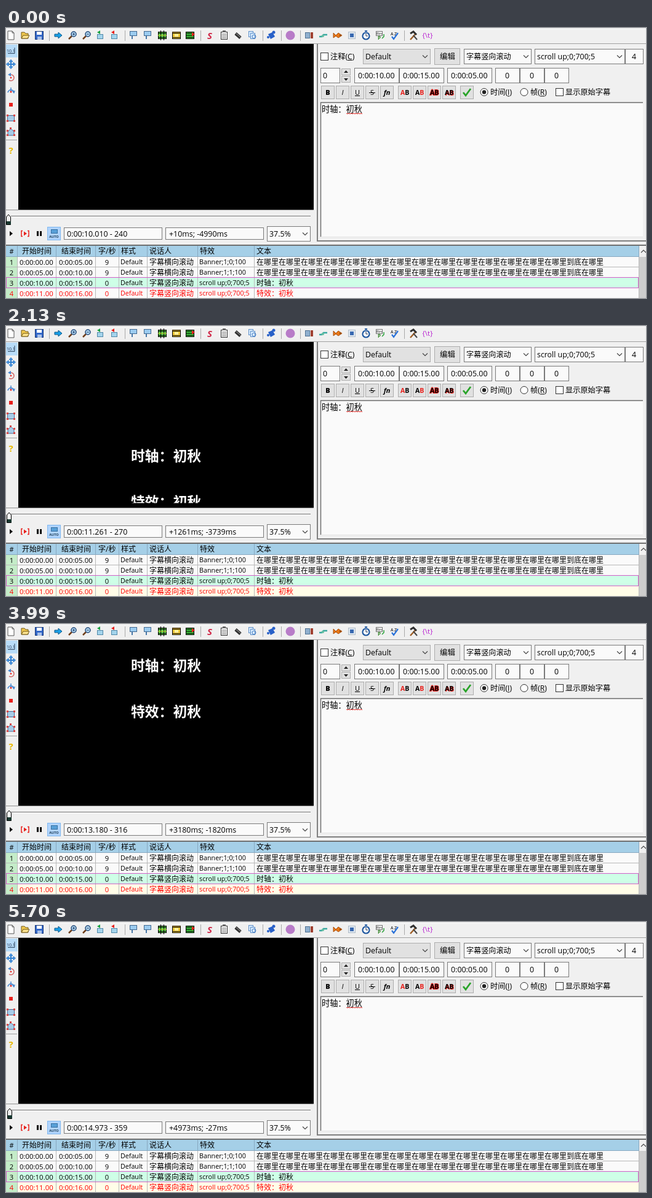
These frames come from a looping animation (1040x440 px, 6.45 s). An HTML page with a canvas:

```html
<!DOCTYPE html>
<html lang="zh-CN">
<head>
<meta charset="utf-8">
<title>字幕竖向滚动</title>
<style>
html, body { margin: 0; height: 100%; overflow: hidden; background: #f0f0f0; }
canvas { display: block; }
</style>
</head>
<body>
<canvas id="stage" width="1040" height="440"></canvas>
<script>
const FONT = '"Open Sans", "Noto Sans CJK SC", "Noto Sans CJK", sans-serif';
const LOOP = 6450;
const FACE = '#f0f0f0', PAPER = '#fafafa', EDGE = '#7a7a7a', BLUE = '#2f7fd0', RED = '#e8201c';
const TIMING = '时轴：初秋', EFFECT = '特效：初秋';
const canvas = document.getElementById('stage');
let g = canvas.getContext('2d', { alpha: false });

function rect(x, y, w, h, fill, edge) {
  if (fill) { g.fillStyle = fill; g.fillRect(x, y, w, h); }
  if (edge) { g.strokeStyle = edge; g.lineWidth = 1; g.strokeRect(x + .5, y + .5, w - 1, h - 1); }
}
function path(points, color, width = 1.5) {
  g.beginPath();
  for (let i = 0; i < points.length; i += 2) g.lineTo(points[i], points[i + 1]);
  g.strokeStyle = color; g.lineWidth = width; g.stroke();
}
function poly(points, fill, edge) {
  g.beginPath();
  for (let i = 0; i < points.length; i += 2) g.lineTo(points[i], points[i + 1]);
  g.closePath();
  g.fillStyle = fill; g.fill();
  if (edge) { g.strokeStyle = edge; g.lineWidth = 1; g.stroke(); }
}
function arc(x, y, r, fill, edge, width = 1.5, from = 0, to = 7) {
  g.beginPath(); g.arc(x, y, r, from, to);
  if (fill) { g.fillStyle = fill; g.fill(); }
  if (edge) { g.strokeStyle = edge; g.lineWidth = width; g.stroke(); }
}
// Text placed by its left edge (or centre) and vertical middle
function text(s, x, mid, size = 12.4, color = '#000', style = '', align = 'left') {
  g.font = `${style} ${size}px ${FONT}`;
  g.textAlign = align; g.fillStyle = color;
  g.fillText(s, x, mid + size * .37);
}
const centred = (s, x, y, size, color, style) => text(s, x, y, size, color, style, 'center');
const chevron = (x, y, up = 1) => path([x - 4, y - 2 * up, x, y + 2 * up, x + 4, y - 2 * up], '#444', 1.1);
function field(x, y, w, h, s, pad = 6) {
  rect(x, y, w, h, PAPER, EDGE);
  text(s, x + pad, y + h / 2);
}
function combo(x, y, w, h, s, fill = PAPER, edge = EDGE, size) {
  rect(x, y, w, h, fill, edge);
  text(s, x + 4, y + h / 2, size);
  chevron(x + w - 9, y + h / 2);
}
function button(x, y, w, h) { rect(x, y, w, h, '#e1e1e1', '#adadad'); }
function at(x, y, draw) { g.save(); g.translate(x, y); draw(); g.restore(); }

function bubble() {
  rect(-6, -7, 12, 8, '#9cccf0', '#406890');
  path([-2, 1, -2, 6], '#4878a8', 2);
}
function lens(sign) {
  path([-6, 6, -1, 1], '#70401c', 2.5);
  arc(2, -2, 4, '#b8dcf4', '#204878');
  path([0, -2, 4, -2], '#103060', 1);
  if (sign) path([2, -4, 2, 0], '#103060', 1);
}
function jump(color) {
  rect(-5, -2, 10, 8, '#a4d4ec', '#5088a8');
  poly([-5, -5, 0, -8, 0, -2], color);
}
function film(color) {
  rect(-7, -6, 14, 12, color, '#000');
  path([-7, -3.5, 7, -3.5], '#000', 1);
  path([-7, 3.5, 7, 3.5], '#000', 1);
}
function toolbar() {
  path([0, 25.5, 1040, 25.5], '#a0a0a0', 1);
  path([0, 2.5, 1040, 2.5], '#f8f8f8', 1);
  for (const x of [70, 193, 316, 417, 447, 478, 647]) path([x + .5, 4, x + .5, 21], '#a8a8a8', 1);
  const icons = [
    [8, () => { poly([-5, -7, 2, -7, 5, -4, 5, 7, -5, 7], '#fff', '#555'); path([2, -7, 2, -4, 5, -4], '#555', 1); }],
    [31, () => { poly([-6, 5, -6, -5, -1, -5, 1, -3, 5, -3, 5, 5], '#f0c850', '#705818'); poly([-6, 5, -3, 0, 7, 0, 4, 5], '#ffe490', '#705818'); }],
    [54, () => { rect(-7, -7, 14, 14, '#3468c8', '#183878'); rect(-4, -6, 8, 5, '#fff'); rect(-3, 2, 7, 5, '#a8c0e8'); }],
    [85, () => poly([-6, -2, 0, -2, 0, -5, 6, 0, 0, 5, 0, 2, -6, 2], '#18a0e8', '#105888')],
    [108, () => lens(true)], [131, () => lens(false)],
    [153, () => jump('#18a040')], [176, () => jump(RED)],
    [207, bubble], [230, bubble],
    [254, () => { film('#58c848'); path([-2.5, -8, -2.5, 8], '#000', 1); path([2.5, -8, 2.5, 8], '#000', 1); path([-7, 0, 7, 0], '#d8d030', 1); }],
    [277, () => { film('#f0c838'); rect(-3, -2, 6, 4, '#fff0a0'); path([-7, -5, 7, -5], '#806020', 1); }],
    [299, () => { film('#38b838'); path([-7, 0, 7, 0], '#000', 1); poly([3, -5, 8, -2, 3, 2], RED); }],
    [331, () => centred('S', 0, 0, 15, '#d02848', 'italic bold')],
    [354, () => { rect(-5, -6, 11, 13, '#fff', '#303030'); rect(-2, -8, 5, 3, '#666'); for (let y = -2; y < 6; y += 3) path([-3, y, 4, y], '#555', 1); }],
    [377, () => { path([-4, -3, 4, 4], '#303030', 5); path([-3, -3, 4, 3], '#aaa', 1); }],
    [400, () => { rect(-6, -7, 8, 10, '#d8ecff', '#6090c8'); rect(-3, -4, 8, 10, '#d8ecff', '#6090c8'); arc(3, 2, 3, null, '#4078c0', 1); }],
    [431, () => { poly([-5, -2, 2, -5, 6, 2, -1, 6], '#2860c8'); arc(4, -5, 2.5, '#2860c8'); arc(-5, 3, 2, '#2860c8'); }],
    [462, () => arc(0, 0, 7.5, '#b87cc8')],
    [492, () => { rect(-6, -5, 8, 10, '#90b0d0', '#507090'); rect(3, -5, 4, 10, '#a04030'); }],
    [515, () => { path([-6, 2, -2, 2, 1, -1, 7, -1], '#38a8a0', 2.5); arc(0, 1, 2, '#68c0a0'); }],
    [539, () => { poly([-7, -4, -3, 0, 1, -4, 7, 0, 1, 4, -3, 1, -7, 4], '#e87818', '#a85010'); arc(4, 0, .8, '#000'); }],
    [562, () => { rect(-6, -6, 12, 12, '#e0e8f0', '#b0bcc8'); rect(-3, -3, 6, 6, '#3868b0'); }],
    [585, () => { arc(0, 1, 5.5, '#fff', '#2058a0', 2.2); path([0, -3, 0, 1, 3, 1], '#203050', 1); rect(-2, -8, 4, 2, '#2058a0'); }],
    [608, () => { rect(-7, -7, 11, 8, '#fff', '#707070'); text('Rin', -6, -3, 6); text('P', -4, 4, 8, '#38882c', 'bold'); path([3, 5, 6, 2, 6, -2], '#28a038'); }],
    [631, () => { text('A', -6, -3, 7); text('Z', 0, -3, 7); path([-4, 2, -1, 6, 6, -4], '#2870d8', 2.2); }],
    [662, () => { path([-5, 7, 4, -3], '#a06028', 2.5); path([-5, -3, 0, -6, 5, -1], '#303030', 3); path([6, 7, 0, 0], '#444', 2); }],
    [685, () => centred('{\\t}', 0, 0, 11.5, '#b820d0')]
  ];
  for (const [x, draw] of icons) at(x, 12, draw);
}

function videoTools() {
  rect(0, 27, 19, 21, '#b8dcf8');
  text('10.1', 1, 37, 7, '#203050');
  path([3, 41.5, 14, 41.5, 14, 32], '#304860', 1);
  at(8, 59, () => {
    path([-5, 0, 5, 0], BLUE, 2); path([0, -5, 0, 5], BLUE, 2);
    for (let i = 0; i < 4; i++) { poly([4, -3, 7.5, 0, 4, 3], '#5098e0', BLUE); g.rotate(Math.PI / 2); }
  });
  at(8, 81, () => { arc(0, 0, 5, null, '#d06868', 1.5, -1.6, 2.2); poly([-5, -5, 0, -8, 0, -2], '#4888d0'); arc(0, 0, 1.3, RED); });
  at(8, 103, () => { arc(0, 3, 5, null, '#4888d0', 1.8, 3.3, 6.2); path([0, -6, 0, 0], '#4888d0'); arc(0, 1, 1.5, RED); poly([2, 0, 7, -1, 5, 4], '#4888d0'); });
  rect(5, 122, 6, 6, RED);
  at(8, 147, () => {
    rect(-6, -5, 12, 10, '#a8cce8', '#486890');
    for (const x of [-7, 4]) for (const y of [-6, 3]) rect(x, y, 3, 3, '#d84848');
  });
  at(8, 169, () => {
    poly([-5, 6, -5, 0, 0, -5, 5, 0, 5, 6], '#a8cce8', '#486890');
    for (const [x, y] of [[-7, 4], [4, 4], [-2, -7], [-7, -3], [4, -3]]) rect(x, y, 3, 3, '#d84848');
  });
  path([0, 182.5, 18, 182.5], '#a0a0a0', 1);
  centred('?', 8, 199, 15, '#e8b800', 'bold');
}

function controls() {
  path([0, 296.5, 500, 296.5], '#909090', 1);
  path([8, 306.5, 495, 306.5], '#707070', 1);
  path([8, 307.5, 495, 307.5], '#fff', 1);
  poly([6, 331, 11, 335, 6, 339], '#000');
  poly([29, 331.5, 34, 335, 29, 338.5], RED);
  path([27, 330.5, 25, 330.5, 25, 339.5, 27, 339.5], RED);
  path([35, 330.5, 37, 330.5, 37, 339.5, 35, 339.5], RED);
  rect(50, 331, 3, 8, '#000'); rect(55, 331, 3, 8, '#000');
  rect(67, 324, 22, 22, '#b0d4fc', '#80b8f0');
  rect(73, 328, 11, 7, '#58a0d8', '#3870a0');
  centred('AUTO', 78, 340, 5.5, '#204058', 'bold');
  combo(424, 323, 71, 25, '37.5%');
}

function checkbox(x, y) { rect(x, y, 13, 13, '#fff', '#333'); }
function keyed(s, key, x, y) {
  text(`${s}(${key})`, x, y, 12.2);
  const a = x + g.measureText(s + '(').width, w = g.measureText(key).width;
  rect(a, y + 6, w, 1, '#000');
}
function editor() {
  rect(505, 26, 2, 322, '#808080');
  rect(505, 346, 535, 2, '#808080');
  checkbox(511, 40); keyed('注释', 'C', 527, 46);
  combo(580, 34, 110, 25, 'Default', '#e1e1e1', '#adadad');
  button(696, 33, 42, 27); centred('编辑', 717.5, 46, 12.4);
  combo(744, 34, 110, 25, '字幕竖向滚动', PAPER, EDGE, 12.1);
  combo(859, 34, 147, 25, 'scroll up;0;700;5');
  field(1006, 34, 30, 25, '4', 11);

  field(511, 65, 32, 25, '0', 4);
  for (const up of [0, 1]) {
    const y = up ? 66 : 78;
    button(545, y, 15, 11);
    poly(up ? [549, 73, 552.5, 69, 556, 73] : [549, 82, 552.5, 86, 556, 82], '#222');
  }
  field(566, 65, 73, 25, '0:00:10.00');
  field(639, 65, 73, 25, '0:00:15.00');
  field(717, 65, 73, 25, '0:00:05.00');
  for (const x of [795, 835, 875]) field(x, 65, 40, 25, '0', 16);

  for (const x of [512, 536, 560, 584, 608, 637, 661, 685, 709, 738]) button(x, 94, 22, 22);
  centred('B', 523, 105, 11, '#000', '800');
  centred('I', 547, 105, 11, '#000', 'italic');
  centred('U', 571, 105, 11); rect(567, 110, 8, 1, '#000');
  centred('S', 595, 105, 11); rect(590, 105, 10, 1, '#000');
  centred('fn', 619, 105, 11, '#000', 'italic bold');
  [[RED, '#000'], ['#000', RED], ['#000', '#000'], ['#000', '#000']].forEach(([a, b], i) => {
    const x = 641 + i * 24;
    if (i === 2) { g.font = `bold 10.5px ${FONT}`; g.textAlign = 'left'; g.strokeStyle = RED; g.lineWidth = 1.8; g.strokeText('AB', x, 108.9); }
    if (i === 3) text('AB', x + 1, 106, 10.5, RED, 'bold');
    text('A', x, 105, 10.5, a, 'bold'); text('B', x + 7.2, 105, 10.5, b, 'bold');
  });
  path([743, 105, 747, 110, 755, 99], '#28a428', 2.8);
  arc(777, 104.5, 6, '#fff', '#333', 1); arc(777, 104.5, 3.2, '#222');
  keyed('时间', 'I', 787, 104.5);
  arc(842, 104.5, 6, '#fff', '#333', 1);
  keyed('帧', 'R', 852, 104.5);
  checkbox(893, 98); text('显示原始字幕', 909, 104.5, 12.2);

  rect(511, 121, 524, 220, PAPER);
  path([1035, 121.5, 511.5, 121.5, 511.5, 341], '#696969', 1.4);
  path([511, 340.5, 1035, 340.5], '#e4e4e4', 1);
  text(TIMING, 513, 132.5, 13.2);
  const wave = [];
  for (let x = 553; x <= 579; x += 2) wave.push(x, 138.5 + x % 4 / 2);
  path(wave, RED, 1);
}

const COLS = [18, 81, 145, 183, 229, 311, 403, 1028];
function gridRow(i, fill, color, cells) {
  const y = 373 + 17 * i, mid = y + 8.5;
  rect(0, y, 1028, 17, fill);
  rect(0, y, 18, 17, '#c4ecc8');
  const [start, end, cps, who, effect, words] = cells;
  centred(i + 1, 9, mid, 11.2, color);
  text(start, 22, mid, 11.4, color);
  text(end, 86, mid, 11.4, color);
  centred(cps, 164, mid, 11.2, color);
  text('Default', 186, mid, 10.7, color);
  text(who, 233, mid, 12, color);
  text(effect, 314, mid, 10.75, color);
  text(words, 407, mid, 12, color);
  rect(0, y + 16, 1028, 1, '#b8b8b8');
  for (const x of COLS) rect(x, y, 1, 17, '#b8b8b8');
}
function grid(lastActive) {
  const long = '在哪里'.repeat(14) + '到底在哪里', v = '字幕竖向滚动', up = 'scroll up;0;700;5';
  gridRow(0, PAPER, '#000', ['0:00:00.00', '0:00:05.00', 9, '字幕横向滚动', 'Banner;1;0;100', long]);
  gridRow(1, PAPER, '#000', ['0:00:05.00', '0:00:10.00', 9, '字幕横向滚动', 'Banner;1;1;100', long]);
  gridRow(2, '#ceffe7', '#000', ['0:00:10.00', '0:00:15.00', 0, v, up, TIMING]);
  gridRow(3, lastActive ? '#fffde8' : PAPER, '#ff0000', ['0:00:11.00', '0:00:16.00', 0, v, up, EFFECT]);
  rect(0, 406, 1028, 18, null, '#d060c8');
}
function gridFrame() {
  rect(0, 353, 1040, 2, '#707070');
  rect(0, 355, 1028, 18, '#a5cfe7');
  for (const x of COLS) rect(x, 355, 1, 18, '#88a8c0');
  rect(0, 372, 1028, 1, '#88a8c0');
  centred('#', 9, 364, 11);
  [['开始时间', 26], ['结束时间', 90], ['字/秒', 150], ['样式', 187], ['说话人', 233], ['特效', 315], ['文本', 407]]
    .forEach(([s, x]) => text(s, x, 364, 12));
  rect(1029, 355, 11, 85, FACE);
  chevron(1036, 364, -1);
  rect(1029, 373, 11, 67, '#cdcdcd');
}

// Everything that never changes is painted once
const backdrop = document.createElement('canvas');
backdrop.width = 1040; backdrop.height = 440;
function paintBackdrop() {
  const screen = g;
  g = backdrop.getContext('2d', { alpha: false });
  rect(0, 0, 1040, 440, FACE);
  toolbar(); videoTools(); controls(); editor(); gridFrame();
  g = screen;
}

function hover(t) {
  const ramp = (from, to) => Math.max(0, Math.min(1, (t - from) / (to - from)));
  const a = ramp(450, 690) - ramp(960, 1260);
  if (a <= 0) return;
  g.globalAlpha = a * .45;
  rect(20, 324, 22, 22, '#9cd0f8', '#0078d7');
  g.globalAlpha = 1;
}
function subtitle(s, age) {
  if (age >= 0) centred(s, 260, 306.2 - age * .075, 22.8, '#fff', '900');
}
function draw(t) {
  const tick = Math.floor(t / 30) * 30;
  const frame = 240 + Math.max(0, Math.min(119, Math.floor((tick - 927) / 40)));
  const ms = Math.round(frame * 1001 / 24);
  g.drawImage(backdrop, 0, 0);
  hover(tick);

  // The scroll effect shows text only in script rows 0 to 700, at 37.5 %
  rect(20, 26, 480, 270, '#000');
  g.save();
  g.beginPath(); g.rect(20, 26, 480, 700 * .375); g.clip();
  subtitle(TIMING, ms - 10000);
  subtitle(EFFECT, ms - 11000);
  g.restore();

  const x = 5 + Math.floor((frame - 248) / 72);
  poly([x - 3.5, 320.5, x - 3.5, 308, x, 304, x + 3.5, 308, x + 3.5, 320.5], FACE, '#000');
  rect(x - 3, 315, 7, 5, '#183830');

  field(94, 325, 160, 20, `0:00:${(ms / 1000).toFixed(3)} - ${frame}`, 5);
  field(259, 325, 160, 20, `+${ms - 10000}ms; ${ms - 15000}ms`);
  grid(ms >= 11000);
}

paintBackdrop();
function loop() {
  draw(performance.now() % LOOP);
  requestAnimationFrame(loop);
}
loop();
</script>
</body>
</html>
```
